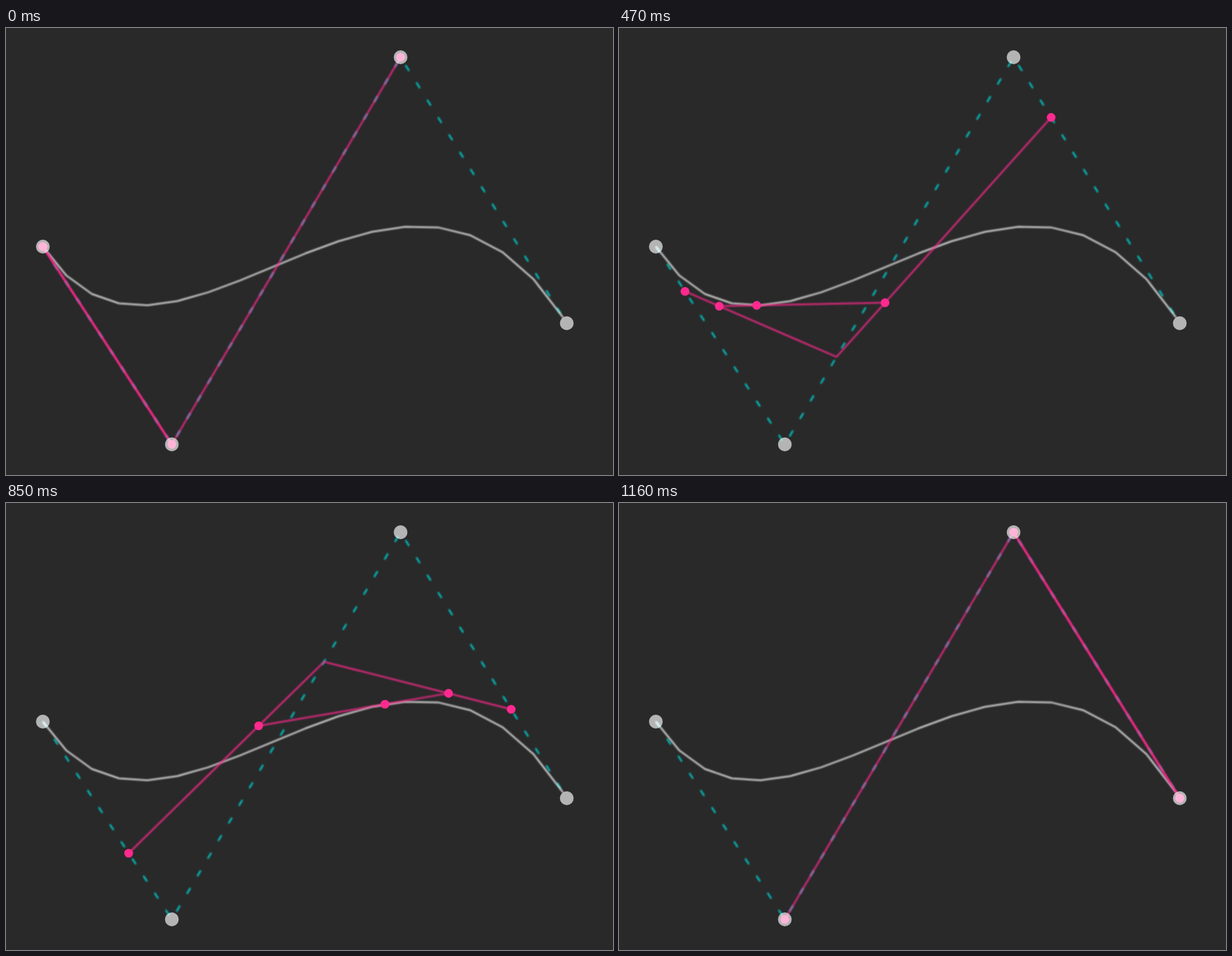
Recreate the animation shown at these times as an HTML page. Size 873 by 642 pixels, loop 1240 ms.

```html
<!DOCTYPE html>
<html lang="en">
<head>
<meta charset="utf-8">
<title>Cubic curve construction</title>
<style>
  html, body { margin: 0; width: 100%; height: 100%; overflow: hidden; background: #292929; }
  svg { display: block; width: 873px; height: 642px; }
  path { fill: none; stroke-width: 2; filter: blur(.9px); }
  circle { filter: blur(.5px); }
  #frame { stroke: #0cc; stroke-width: 2.3; stroke-dasharray: 9.79 19.58; }
  #curve { stroke: #f0f0f0; stroke-linejoin: round; }
  .link { stroke: #ff2a8f; }
  .dot { fill: #ff2a8f; }
  .handle { fill: #fff; fill-opacity: .65; }
</style>
</head>
<body>
<svg viewBox="0 0 873 642">
  <path id="frame"/>
  <path id="curve"/>
  <path class="link" id="outer"/>
  <path class="link" id="inner"/>
  <g id="dots"></g>
  <g id="handles"></g>
</svg>
<script>
const P = [[53, 314], [238.5, 598], [567.5, 42], [806.5, 424]];
const LOOP = 1240, STEPS = 16, LEAD = 5;
const CURVE_STEP = 0.0584;
// Key points [step, curve parameter]: a slow start, then a steady run
const KEYS = [[0, 0], [2, .063], [5, .149], [6, .226], [7, .347], [12, .745], [15, 1]];

const $ = id => document.getElementById(id);
const mix = (a, b, t) => a.map((v, i) => v + (b[i] - v) * t);
const reduce = (pts, t) => pts.slice(1).map((p, i) => mix(pts[i], p, t));
const draw = (id, pts) => $(id).setAttribute('d', 'M' + pts.map(p => p.join(' ')).join('L'));

function circle(parent, cls, r) {
  const c = document.createElementNS('http://www.w3.org/2000/svg', 'circle');
  c.setAttribute('class', cls);
  c.setAttribute('r', r);
  return $(parent).appendChild(c);
}

function place(c, [x, y]) {
  c.setAttribute('cx', x);
  c.setAttribute('cy', y);
}

function levels(t) {
  const q = reduce(P, t), r = reduce(q, t);
  return { q, r, b: reduce(r, t)[0] };
}

function progress(step) {
  const i = Math.max(1, KEYS.findIndex(([s]) => s >= step));
  const [a, b] = [KEYS[i - 1], KEYS[i]];
  return mix(a, b, (step - a[0]) / (b[0] - a[0]))[1];
}

draw('frame', P);
draw('curve', Array.from({ length: 18 }, (_, i) => levels(i * CURVE_STEP).b));
P.forEach(p => place(circle('handles', 'handle', 9.9), p));
const dots = Array.from({ length: 5 }, () => circle('dots', 'dot', 6.3));

function pose(t) {
  const { q, r, b } = levels(t);
  draw('outer', q);
  draw('inner', r);
  [q[0], q[2], ...r, b].forEach((p, i) => place(dots[i], p));
}

const start = performance.now();
function tick() {
  const ms = (performance.now() - start) % LOOP;
  const step = Math.floor((ms + LEAD) / LOOP * STEPS);
  pose(progress(Math.min(step, STEPS - 1)));
  requestAnimationFrame(tick);
}
tick();
</script>
</body>
</html>
```
